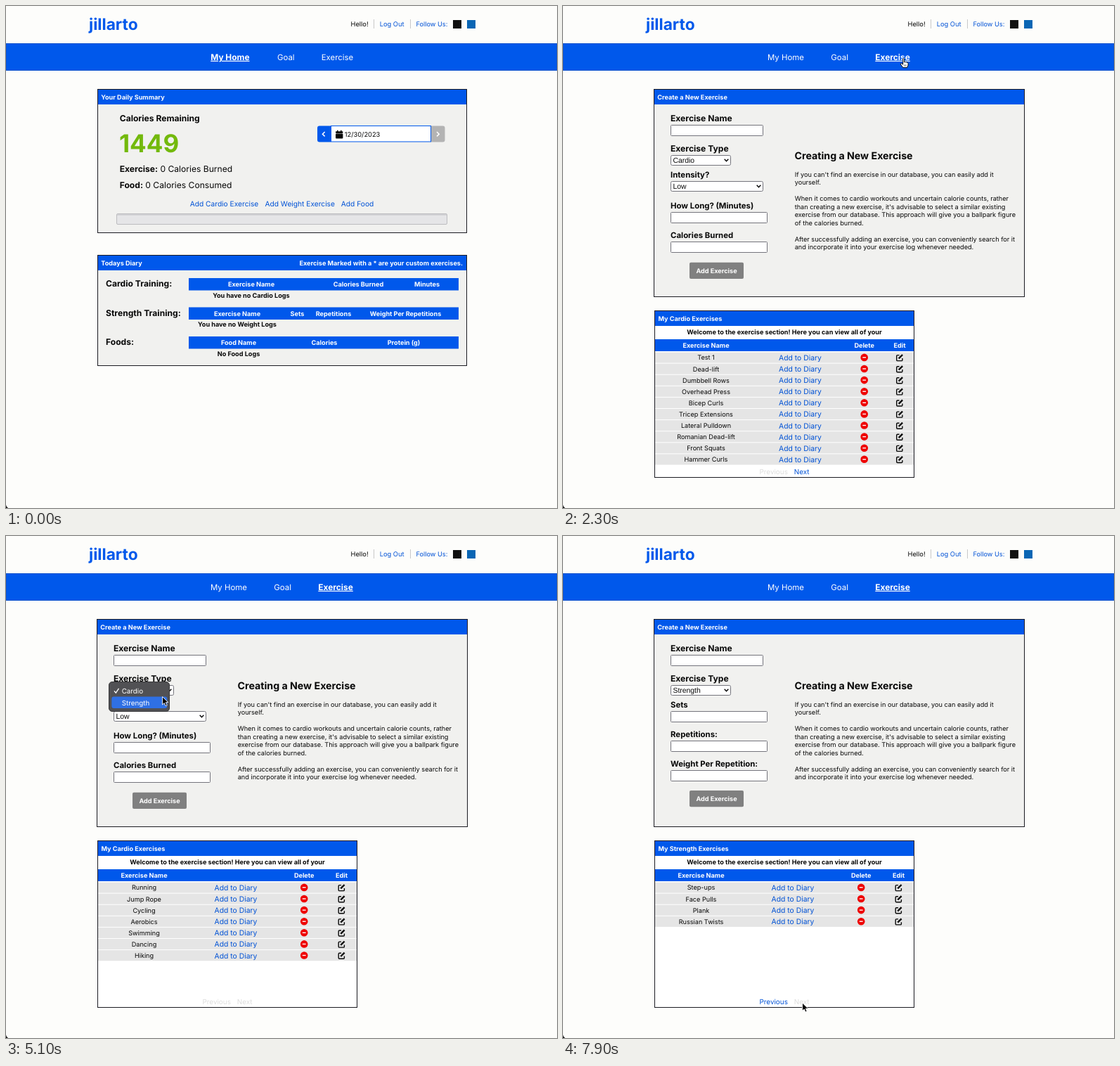
Write an HTML page that moves like this. It is 784 by 714 pixels and loops after 8 s.

```html
<!DOCTYPE html>
<html lang="en">
<head>
<meta charset="utf-8">
<title>Fitness diary</title>
<style>
html, body { margin: 0; width: 100%; height: 100%; overflow: hidden; background: #fdfdfb; }
svg { display: block; width: 100%; height: 100%; }
text { font-family: Inter, "Open Sans", sans-serif; text-rendering: geometricPrecision; white-space: pre; }
.ui { font-family: "Liberation Sans", Arial, sans-serif; }
</style>
</head>
<body>
<svg id="stage" viewBox="0 0 784 714"></svg>
<script>
const BLUE = '#0058eb', LINK = '#0052d6', INK = '#080808', CARD = '#f1f1ef';
const SMALL = 9.15, LABEL = 11.4, TITLE = 12.1;
const LOOP = 8000;

// y is the middle of the capitals
const text = (x, y, str, size, o = {}) =>
  `<text x="${x}" y="${(y + size * 0.36).toFixed(2)}" font-size="${size}" font-weight="${o.w || 400}"` +
  ` fill="${o.fill || INK}" text-anchor="${o.at || 'start'}" class="${o.cls || ''}"` +
  `${o.line ? ' text-decoration="underline"' : ''}>${str}</text>`;
const bold = (x, y, str, size, o = {}) => text(x, y, str, size, { w: 700, ...o });
const head = (x, y, str, at = 'middle') => bold(x, y, str, SMALL, { fill: '#fff', at });
const rect = (x, y, w, h, fill, more = '') =>
  `<rect x="${x}" y="${y}" width="${w}" height="${h}" fill="${fill}" ${more}/>`;
const stroke = (d, color, w, more = '') =>
  `<path d="${d}" fill="none" stroke="${color}" stroke-width="${w}" ${more}/>`;
const group = (id, body) => `<g id="${id}" display="none">${body}</g>`;

function card(x, y, w, h, title, fill = CARD) {
  return rect(x, y, w, h, fill) + rect(x, y, w, 22, BLUE) +
    rect(x + .5, y + .5, w - 1, h - 1, 'none', 'stroke="#1b1b22"') +
    head(x + 5.3, y + 11.3, title, 'start');
}
const input = (y, w) => rect(153.5, y + .5, w - 1, 15, '#fff', 'stroke="#74747c" rx="1"');
function select(y, w, label) {
  const cx = 153 + w - 6.5;
  return rect(153.5, y + .5, w - 1, 14, '#fff', 'stroke="#74747c" rx="2"') +
    text(156.5, y + 7.2, label, 10.4, { cls: 'ui' }) +
    stroke(`M${cx - 2.8} ${y + 5.8}l2.8 2.9 2.8-2.9`, INK, 1.5);
}
const button = y => rect(180, y, 77, 23.3, '#808080', 'rx="2"') +
  head(218.5, y + 12, 'Add Exercise');

function nav(active) {
  const xs = active ? [291, 381.3, 444.3] : [291.2, 386, 448.7];
  return ['My Home', 'Goal', 'Exercise'].map((s, i) => {
    const on = i === active;
    return text(xs[i], 72.5, s, on ? 11.9 : LABEL, { fill: '#fff', w: on ? 700 : 400, line: on });
  }).join('');
}

function header() {
  return rect(.5, 53.5, 783, 38, BLUE, 'stroke="#0a50cc"') +
    bold(118, 26, 'jillarto', 22.75, { fill: BLUE }) +
    text(490.5, 25.5, 'Hello!', 9.3) +
    text(531.7, 25.5, 'Log Out', 9.3, { fill: LINK }) +
    text(583.5, 25.5, 'Follow Us:', 9.2, { fill: LINK }) +
    rect(523, 19, 1, 13, '#c9c9c9') + rect(575, 19, 1, 13, '#c9c9c9') +
    rect(636, 20, 12, 12, '#101010') + rect(656, 20, 12, 12, '#0a66b4');
}

function datePicker() {
  return '<path d="M462 170.5H446q-3 0-3 3v17q0 3 3 3h16z" fill="' + BLUE + '"/>' +
    '<path d="M605 170.5h16.5q3 0 3 3v17q0 3-3 3H605z" fill="#b3b3b3"/>' +
    rect(462.5, 170.5, 142, 22.5, '#fff', `stroke="${BLUE}"`) +
    stroke('M453.6 179l-3.2 3.2 3.2 3.2', '#fff', 1.5) +
    stroke('M613 179l3.2 3.2-3.2 3.2', '#fff', 1.5) +
    rect(469, 178.3, 10.4, 2.6, INK, 'rx=".8"') + rect(469, 181.5, 10.4, 7, INK, 'rx="1"') +
    rect(471, 176.7, 1.5, 3, INK) + rect(476, 176.7, 1.5, 3, INK) +
    text(481.8, 182.3, '12/30/2023', 9.25);
}

function diaryRow(y, label, cols, noteX, note) {
  return bold(142, y, label, TITLE) + rect(260, y - 8, 384, 17.5, BLUE) +
    cols.map(([x, s]) => head(x, y + .8, s)).join('') +
    bold(noteX, y + 16.3, note, SMALL, { at: 'middle' });
}

function home() {
  const line = (y, a, b) => `<text x="161.7" y="${y + 4.3}" font-size="${TITLE}" fill="${INK}">` +
    `<tspan font-weight="700">${a}</tspan> ${b}</text>`;
  const link = (x, s) => text(x, 281.3, s, 10.2, { fill: LINK });
  return nav(0) + card(130, 118, 526, 205, 'Your Daily Summary') +
    bold(161.7, 159.2, 'Calories Remaining', TITLE) +
    bold(161, 195, '1449', 35, { fill: '#73b90c' }) +
    line(232, 'Exercise:', '0 Calories Burned') + line(255, 'Food:', '0 Calories Consumed') +
    datePicker() +
    link(261.7, 'Add Cardio Exercise') + link(368.5, 'Add Weight Exercise') + link(476.8, 'Add Food') +
    rect(157.5, 295.5, 470, 15, '#e5e5e7', 'stroke="#bcbcbf" rx="1.5"') +
    rect(158, 296, 469, 2, '#d2d2d5') +
    card(130, 354, 526, 158, 'Todays Diary') +
    head(650, 365.3, 'Exercise Marked with a * are your custom exercises.', 'end') +
    diaryRow(395, 'Cardio Training:',
      [[349, 'Exercise Name'], [501.5, 'Calories Burned'], [599, 'Minutes']], 349, 'You have no Cardio Logs') +
    diaryRow(436.5, 'Strength Training:',
      [[329, 'Exercise Name'], [414.5, 'Sets'], [466, 'Repetitions'], [568.5, 'Weight Per Repetitions']],
      329, 'You have no Weight Logs') +
    diaryRow(478, 'Foods:',
      [[331, 'Food Name'], [453, 'Calories'], [566, 'Protein (g)']], 331, 'No Food Logs');
}

const ADVICE = [
  [239.3, "If you can't find an exercise in our database, you can easily add it"],
  [250.9, 'yourself.'],
  [273.8, 'When it comes to cardio workouts and uncertain calorie counts, rather'],
  [285.3, "than creating a new exercise, it's advisable to select a similar existing"],
  [296.9, 'exercise from our database. This approach will give you a ballpark figure'],
  [308.4, 'of the calories burned.'],
  [331.4, 'After successfully adding an exercise, you can conveniently search for it'],
  [343, 'and incorporate it into your exercise log whenever needed.']
];

function exercisePage() {
  return nav(2) + card(129, 118, 528, 296, 'Create a New Exercise') +
    bold(153, 159.2, 'Exercise Name', TITLE) + input(169, 132) +
    bold(153, 202.2, 'Exercise Type', TITLE) +
    bold(329.5, 212.8, 'Creating a New Exercise', 14.2) +
    ADVICE.map(([y, s]) => text(329.7, y, s, 9.17)).join('') +
    card(130, 433, 370, 238, '', '#fff') +
    bold(315, 464.2, 'Welcome to the exercise section! Here you can view all of your', SMALL, { at: 'middle' }) +
    rect(131, 474, 368, 17, BLUE);
}

const cardioForm = () => select(212, 86, 'Cardio') +
  bold(153, 239.5, 'Intensity?', LABEL) + select(249, 132, 'Low') +
  bold(153, 284, 'How Long? (Minutes)', LABEL) + input(293, 138) +
  bold(153, 326, 'Calories Burned', LABEL) + input(335, 138) + button(364.7);

const strengthForm = () => select(212, 86, 'Strength') +
  bold(153, 239.5, 'Sets', LABEL) + input(249, 138) +
  bold(153, 281.7, 'Repetitions:', LABEL) + input(291, 138) +
  bold(153, 323.8, 'Weight Per Repetition:', LABEL) + input(333, 138) + button(362);

const rowY = i => 500.2 + i * 16.1;

function list(names, cols, prev, next) {
  const [a, b, c, d] = cols;
  const pager = (x, s, on) => text(x, 662, s, 9.9, { fill: on ? LINK : '#dcdcdc' });
  const rows = names.map((s, i) => {
    const y = rowY(i);
    return rect(131, y - 7.7, 368, 15.1, '#e5e5e5') +
      text(a, y, s, SMALL, { at: 'middle' }) +
      text(b, y, 'Add to Diary', 10.35, { fill: LINK, at: 'middle' }) +
      `<circle cx="${c}" cy="${y - .3}" r="5.3" fill="#ee0000"/>` + rect(c - 2.4, y - 1, 4.8, 1.4, '#fff') +
      stroke(`M${d - .5} ${y - 3.6}h-2.6q-1.2 0-1.2 1.2v5.6q0 1.2 1.2 1.2h5.8q1.2 0 1.2-1.2v-2.4`, INK, 1.4) +
      stroke(`M${d - 1.3} ${y + 1.2}l5.4-5.4`, INK, 2.4);
  }).join('');
  return rows + head(a, 482.7, 'Exercise Name') + head(c, 482.7, 'Delete') + head(d, 482.7, 'Edit') +
    pager(279.5, 'Previous', prev) + pager(328.7, 'Next', next);
}

const WIDE = [203.5, 337.5, 428.7, 479], SLIM = [196.5, 327, 424.2, 477.5];
const STRENGTH = ['Test 1', 'Dead-lift', 'Dumbbell Rows', 'Overhead Press', 'Bicep Curls',
  'Tricep Extensions', 'Lateral Pulldown', 'Romanian Dead-lift', 'Front Squats', 'Hammer Curls'];
const CARDIO = ['Running', 'Jump Rope', 'Cycling', 'Aerobics', 'Swimming', 'Dancing', 'Hiking'];
const MORE = ['Step-ups', 'Face Pulls', 'Plank', 'Russian Twists'];

const menu = () =>
  rect(146.5, 207.5, 86, 42, '#515154', 'stroke="#39393b" rx="4.5"') +
  rect(150.3, 228.6, 79, 16.4, '#2f70e4', 'rx="3" id="pick"') +
  stroke('M154 220.3l2.3 2.8 4.2-6.3', '#fff', 1.3) +
  text(164.7, 220, 'Cardio', 9.8, { fill: '#fff' }) +
  text(164.7, 237, 'Strength', 9.8, { fill: '#fff' });

const pointers =
  group('arrow', '<path d="M0 0V11.4L2.7 9 4.5 13.1 6.6 12.2 4.8 8.2H8.4Z" fill="#000" stroke="#fff" stroke-width=".9"/>') +
  group('hand', '<path d="M-.9 0Q0-1.3 1 0V5Q1.6 4 2.8 4.8 3.7 4.2 4.7 5.3 6 4.9 6.4 6.3V9.2L5 12.6H-.8L-4.2 8Q-4.6 6.6-3.1 6.6L-.9 8.2Z" fill="#fff" stroke="#000" stroke-width=".9"/>' +
    stroke('M1.3 8.2v2.6M3.3 8.2v2.6', '#000', .6)) +
  group('beam', stroke('M-2.2-5.5Q0-5.5 0-4V4Q0 5.5-2.2 5.5M2.2-5.5Q0-5.5 0-4M0 4Q0 5.5 2.2 5.5M-1.3 1.5h2.6', '#111', 1));

document.getElementById('stage').innerHTML =
  rect(0, 0, 784, 714, '#fdfdfb') + header() +
  group('home', home()) +
  group('page', exercisePage()) +
  group('titleCardio', head(135.5, 444.3, 'My Cardio Exercises', 'start')) +
  group('titleStrength', head(135.5, 444.3, 'My Strength Exercises', 'start')) +
  group('formCardio', cardioForm()) +
  group('formStrength', strengthForm()) +
  group('listStrength', list(STRENGTH, WIDE, false, true)) +
  group('listCardio', list(CARDIO, SLIM, false, false)) +
  group('listMore', list(MORE, SLIM, true, false)) +
  group('focus', rect(153.3, 212.3, 85, 14, 'none', `stroke="${BLUE}" stroke-width="1.8" rx="2.5"`)) +
  group('hover', rect(307.3, 0, 60.5, .9, LINK, 'id="rule"')) +
  group('menu', menu()) +
  `<g id="pointer">${pointers}</g>` +
  '<path d="M0 709.5Q.6 713 3 714H0Z" fill="#111"/>';

const el = {};
document.querySelectorAll('[id]').forEach(n => el[n.id] = n);
const show = (id, on) => el[id].setAttribute('display', on ? 'inline' : 'none');

const T = { page: 2200, cardio: 2400, open: 4400, pick: 5400, next: 7500 };

// time, x, y, pointer
const PATH = [
  [1200, 536, 226, 'arrow'], [1550, 486.5, 79.5, 'arrow'], [1800, 486, 79, 'hand'],
  [2300, 484.6, 75, 'hand'], [2550, 485, 76, 'arrow'], [3000, 505, 225, 'beam'],
  [3300, 506, 239.5, 'beam'], [3500, 500, 238, 'arrow'], [4100, 224, 219, 'arrow'],
  [4600, 223, 219, 'arrow'], [5000, 222.5, 228.5, 'arrow'], [5600, 223, 229, 'arrow'],
  [6500, 320, 560, 'hand'], [6900, 321, 583.5, 'hand'], [7100, 323, 590, 'hand'],
  [7400, 340, 659, 'hand'], [7500, 340, 661, 'arrow'], [7900, 340.5, 664, 'arrow'], [LOOP, 340.5, 664, 'arrow']
];

function pointerAt(t) {
  if (t < PATH[0][0]) return null;
  let i = 0;
  while (i < PATH.length - 2 && t >= PATH[i + 1][0]) i++;
  const [t0, x0, y0, kind] = PATH[i], [t1, x1, y1] = PATH[i + 1];
  const p = (t - t0) / (t1 - t0), e = p * p * (3 - 2 * p);
  return { x: x0 + (x1 - x0) * e, y: y0 + (y1 - y0) * e, kind };
}

function draw(t) {
  const page = t >= T.page, strong = t >= T.pick, more = t >= T.next;
  const cardio = t >= T.cardio && !strong, open = t >= T.open && !strong;
  show('home', !page);
  show('page', page);
  show('titleCardio', page && !strong);
  show('titleStrength', strong);
  show('formCardio', page && !strong);
  show('formStrength', strong);
  show('listCardio', cardio);
  show('listStrength', page && !cardio && !more);
  show('listMore', more);
  show('menu', open);
  show('focus', strong && !more);

  const c = pointerAt(t);
  for (const k of ['arrow', 'hand', 'beam']) show(k, c && c.kind === k);
  if (c) el.pointer.setAttribute('transform', `translate(${c.x} ${c.y})`);
  show('pick', c && c.y > 227);

  const row = c ? Math.round((c.y - rowY(0)) / 16.1) : -1;
  const hover = strong && !more && c.kind === 'hand' && row >= 0 && row < STRENGTH.length;
  show('hover', hover);
  if (hover) el.rule.setAttribute('y', rowY(row) + 4.9);
}

const start = performance.now();
function tick() {
  draw((performance.now() - start) % LOOP);
  requestAnimationFrame(tick);
}
draw(0);
requestAnimationFrame(tick);
</script>
</body>
</html>
```
